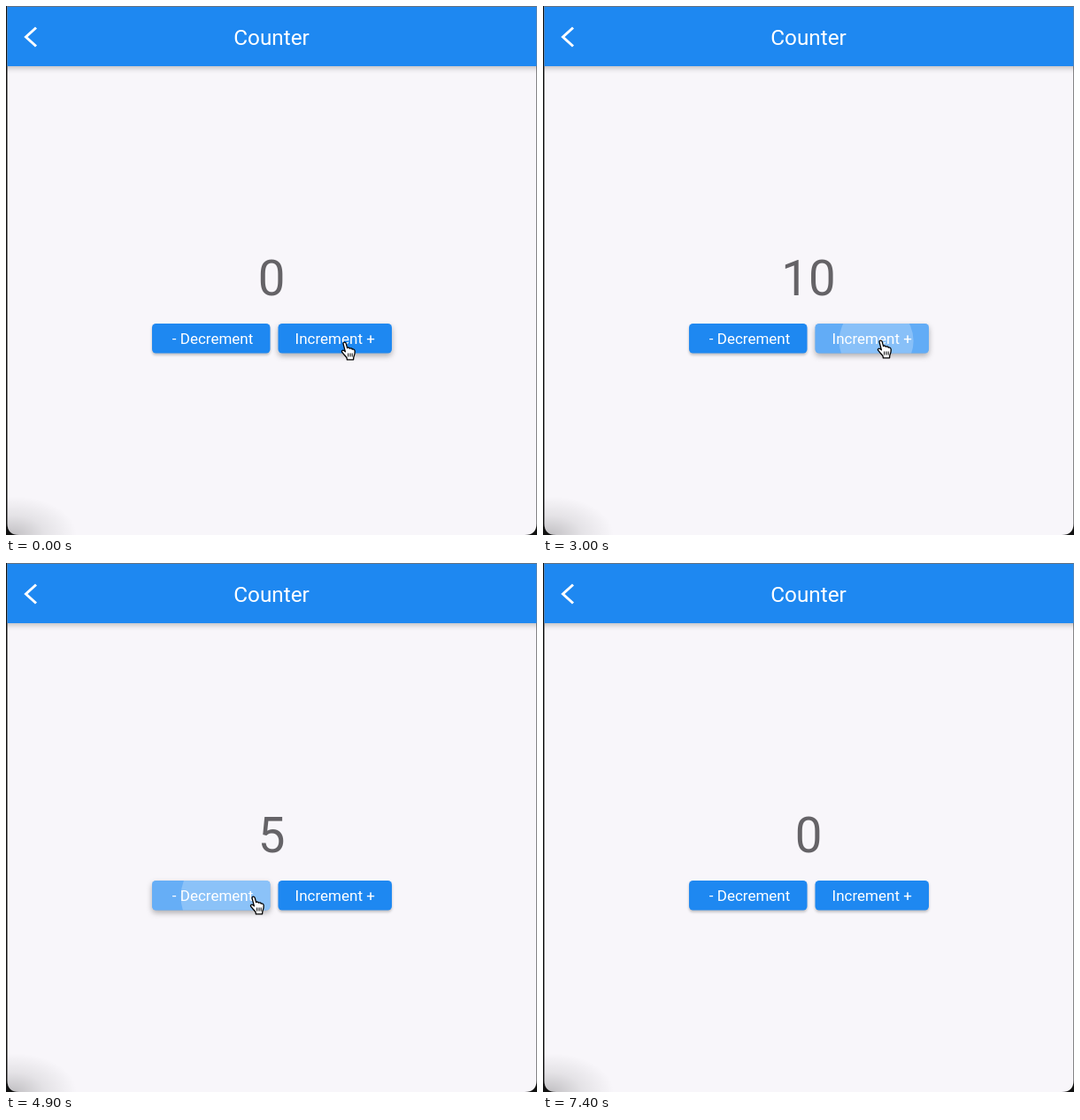
An HTML page for the animation above (7.8 s loop, 600 by 598 pixels).

```html
<!DOCTYPE html>
<html>
<head>
<meta charset="utf-8">
<title>Counter</title>
<style>
  html, body { margin: 0; width: 100%; height: 100%; overflow: hidden; background: #111; }
  svg { display: block; width: 100%; height: 100%; }
  text { font-family: Roboto, sans-serif; text-anchor: middle; fill: #fff; }
  .label { font-size: 17px; }
  .button { fill: #1e88f1; filter: drop-shadow(0 2px 1.5px rgba(0,0,0,.24)); }
  .button.hover { filter: drop-shadow(0 3px 3px rgba(0,0,0,.3)); }
  .bar { fill: #1e88f1; filter: drop-shadow(0 2px 3px rgba(0,0,0,.25)); }
</style>
</head>
<body>
<svg viewBox="0 0 600 598" preserveAspectRatio="none">
  <defs>
    <clipPath id="window"><path d="M1.5 0H599.5V585Q599.5 598 586 598H15Q1.5 598 1.5 585Z"/></clipPath>
    <clipPath id="decClip"><rect x="165" y="359" width="133.5" height="33.5" rx="4.5"/></clipPath>
    <clipPath id="incClip"><rect x="307.5" y="359" width="128.5" height="33.5" rx="4.5"/></clipPath>
    <radialGradient id="smudge">
      <stop offset="0" stop-color="#000" stop-opacity=".22"/>
      <stop offset=".5" stop-color="#000" stop-opacity=".08"/>
      <stop offset="1" stop-color="#000" stop-opacity="0"/>
    </radialGradient>
  </defs>
  <g clip-path="url(#window)">
    <rect width="600" height="598" fill="#f8f6fa"/>
    <ellipse cx="8" cy="598" rx="72" ry="44" fill="url(#smudge)"/>
    <rect class="bar" x="-10" y="-10" width="620" height="78"/>
    <rect width="600" height="1" fill="#66727f"/>
  </g>
  <path d="M34 24.5L22.5 35L34 45.5" fill="none" stroke="#fff" stroke-width="3"/>
  <text x="300" y="43.5" font-size="24.3">Counter</text>
  <text id="count" x="300" y="327" font-size="54.6" style="fill:#656367">0</text>

  <rect id="dec" class="button" x="165" y="359" width="133.5" height="33.5" rx="4.5"/>
  <rect id="inc" class="button" x="307.5" y="359" width="128.5" height="33.5" rx="4.5"/>
  <g id="decInk" clip-path="url(#decClip)" fill="#fff"></g>
  <g id="incInk" clip-path="url(#incClip)" fill="#fff"></g>
  <text class="label" x="233.6" y="382">- Decrement</text>
  <text class="label" x="371.7" y="382">Increment +</text>

  <g id="cursor" fill="#fff" stroke="#000" stroke-width="1.3" stroke-linejoin="round">
    <g id="hand">
      <path d="M3 2.6C3 .6 5.6.5 6.2 2.4L7.6 7.6C8.6 6.6 10 7 10.4 8.2C11.6 7.4 12.9 7.9 13.2 9.1C14.6 8.6 16 9.4 16.2 11C16.5 14 15.6 16 14.8 18L14.6 20.8H7.4L7 18.5C5.5 16.5 2.8 14 1.6 12.2C.8 10.6 2.6 9.6 3.9 10.6L5.4 11.8Z"/>
      <path d="M8.7 13.5V17.5M11 13.5V17.5M13.2 13.5V17.5" fill="none" stroke-width="1"/>
    </g>
    <path id="arrow" d="M4 1V17L7.7 13.5L10.2 19.2L12.8 18L10.3 12.5H15.2Z" stroke="#fff" fill="#000"/>
  </g>
</svg>
<script>
const LOOP = 7800, FRAME = 100, GROW = 225, FADE = 375;
const $ = id => document.getElementById(id);
const clamp = v => Math.max(0, Math.min(1, v));
const mix = (a, b, k) => a + (b - a) * k;
const smooth = (t, from, to) => {
  const k = clamp((t - from) / (to - from));
  return k * k * (3 - 2 * k);
};

// Press times, tap point, button centre and full ripple radius
const buttons = [
  { id: 'inc', step: 1, tap: [381, 381], mid: [371.7, 375.7], radius: 66.5,
    presses: [760, 1220, 1500, 1760, 2005, 2180, 2370, 2560, 2750, 2945, 3140] },
  { id: 'dec', step: -1, tap: [279, 380], mid: [231.7, 375.7], radius: 69,
    presses: [4040, 4200, 4320, 4480, 4650, 4820, 4980, 5140, 5290, 5430, 5570] }
];

for (const b of buttons) {
  b.ripples = b.presses.map(() => {
    const c = document.createElementNS('http://www.w3.org/2000/svg', 'circle');
    $(b.id + 'Ink').append(c);
    return c;
  });
}

function drawRipple(circle, age, b) {
  const k = 1 - (1 - clamp(age / GROW)) ** 2.3;
  circle.setAttribute('cx', mix(b.tap[0], b.mid[0], k));
  circle.setAttribute('cy', mix(b.tap[1], b.mid[1], k));
  circle.setAttribute('r', b.radius * mix(.3, 1, k));
  circle.setAttribute('opacity', age < 0 ? 0 : .24 * (1 - clamp((age - GROW) / FADE)));
}

function drawCursor(t) {
  const across = smooth(t, 3350, 3850), leave = smooth(t, 5900, 6350);
  const x = mix(mix(378, 377, smooth(t, 100, 500)), 275, across) + 12 * leave;
  const y = mix(mix(379, 377, smooth(t, 100, 500)), 376, across) + 85 * leave;
  const tip = x + 4;
  const inside = y < 391;
  const onDec = inside && tip < 298.5, onInc = inside && tip > 307.5;
  const shown = t < 6400;
  $('cursor').setAttribute('transform', `translate(${x} ${y})`);
  $('cursor').style.display = shown ? '' : 'none';
  $('hand').style.display = onDec || onInc ? '' : 'none';
  $('arrow').style.display = onDec || onInc ? 'none' : '';
  $('dec').classList.toggle('hover', shown && onDec);
  $('inc').classList.toggle('hover', shown && onInc);
}

function draw(now) {
  const t = Math.floor(now % LOOP / FRAME) * FRAME;
  let count = 0;
  for (const b of buttons) {
    b.presses.forEach((start, i) => {
      if (t >= start) count += b.step;
      drawRipple(b.ripples[i], t - start, b);
    });
  }
  $('count').textContent = count;
  drawCursor(t);
}

const begin = performance.now();
function tick() {
  draw(performance.now() - begin);
  requestAnimationFrame(tick);
}
tick();
</script>
</body>
</html>
```
